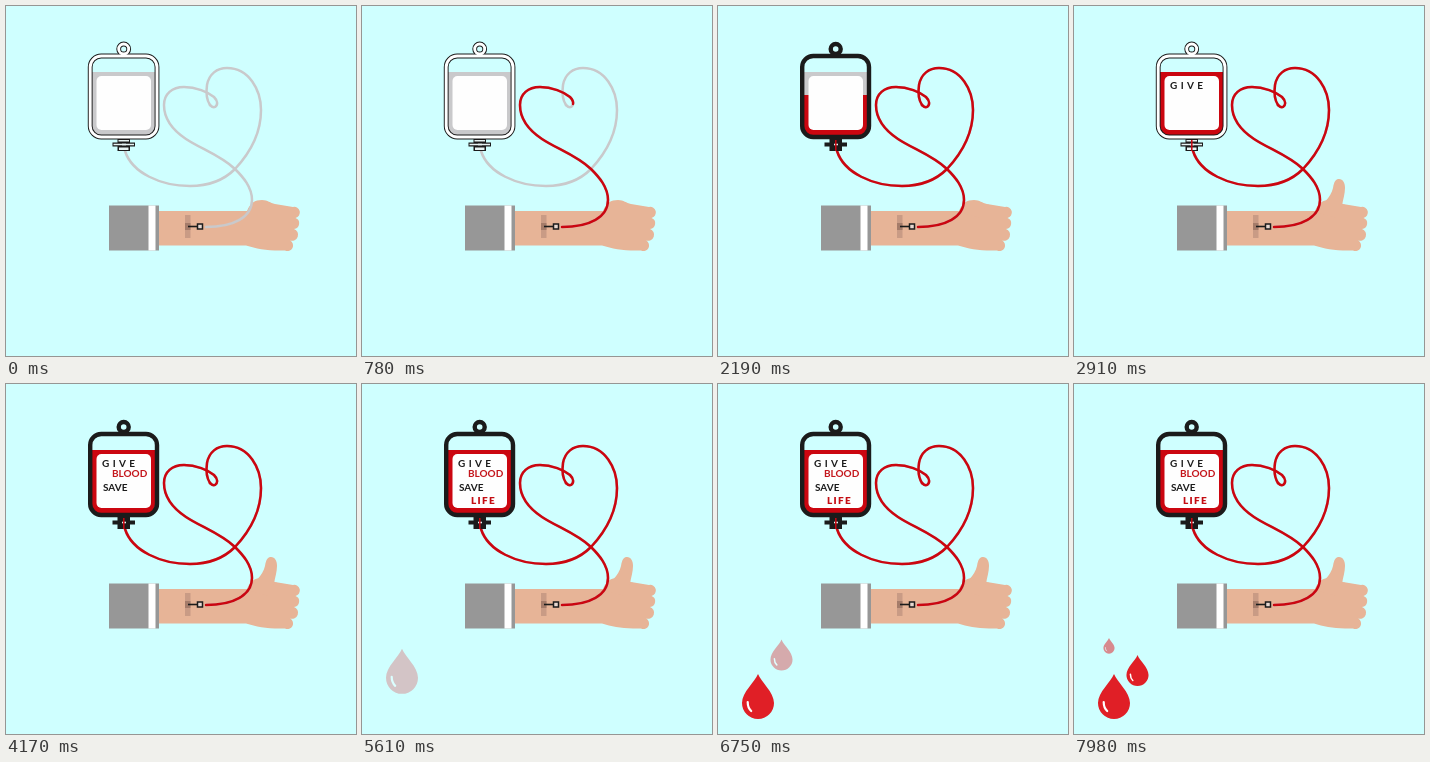
Recreate the animation shown at these times as an HTML page. Size 350 px wide and 350 px high, loop 8 s.

```html
<!DOCTYPE html>
<html lang="en">
<head>
<meta charset="utf-8">
<title>Give blood</title>
<style>
html, body { margin: 0; width: 100%; height: 100%; overflow: hidden; background: #cfffff; }
svg { display: block; width: 100vw; height: 100vh; }
text { font-family: Lato, "Open Sans", sans-serif; font-weight: 700; font-size: 10px; }
.tube { fill: none; stroke-width: 2.5; stroke-linecap: round; stroke-linejoin: round; }
.red { stroke: #cb0610; }
.grey { stroke: #c9c9cb; }
</style>
</head>
<body>
<svg viewBox="0 0 350 350">
  <defs>
    <path id="tubeA" d="M200 221C228 221 246 211 246 194C246 181 237 171 229 163C214 149 195 143 180 133C165 123 158 111 158 99C158 88 166 81 178 81C190 81 202 86 208 91C212 95 212 99 209 101C207 102 205 100 204 99"/>
    <path id="tubeB" d="M204 99C200 93 200 86 201 79C203 68 211 62 221 62C243 62 255 84 255 104C255 126 244 147 229 163C216 176 201 180 184 180C155 180 126 167 119 145"/>
    <g id="drop">
      <path d="M0 0C3 8 16 18 16 29A16 16 0 0 1-16 29C-16 18-3 8 0 0Z" fill="#e01f26"/>
      <path d="M-10.3 28C-10.3 32-9 35-6.8 37" fill="none" stroke="#fff" stroke-width="2.2" stroke-linecap="round"/>
    </g>
    <g id="frame" fill="none">
      <circle cx="117.7" cy="43" r="5"/>
      <rect x="84.2" y="50" width="66.8" height="81" rx="11"/>
    </g>
    <clipPath id="fillClip"><rect id="fillWipe" x="80" width="80" height="80"/></clipPath>
    <clipPath id="thumbClip"><rect id="thumbWipe" x="230" width="70" height="90"/></clipPath>
  </defs>

  <rect width="350" height="350" fill="#cfffff"/>

  <g fill="#e7b497">
    <path d="M152 205H241C244 197 249 194 256 194C262 194 264 197 269 198L287 201A5.5 5.5 0 0 1 289.500 212A5.700 5.700 0 0 1 288 223A5.500 5.500 0 0 1 284 234.500A5 5 0 0 1 279 244.500C262 245 251 243 240 239.500H152Z"/>
    <path clip-path="url(#thumbClip)" d="M240 206C247 199 257 192 259 182C260 175 262 173 265 173C269 173 271 177 271 182C271 188 269 193 268 200L262 212Z"/>
  </g>
  <path d="M103 199.500H153V244.500H103Z" fill="#979797"/>
  <path d="M142.500 199.500H149.500V244.500H142.500Z" fill="#fff"/>
  <path d="M179 209H184.500V232H179Z" fill="#c99b85"/>
  <path d="M179 217H184.500V224H179Z" fill="#a57c6a"/>

  <use href="#tubeA" class="tube grey"/>
  <use href="#tubeB" class="tube grey"/>
  <path id="flowA" class="tube red"/>
  <path id="flowB" class="tube red"/>

  <path d="M182 220.500H191" stroke="#1c1c1c" stroke-width="1.600"/>
  <rect x="191.500" y="218" width="5" height="5" fill="#e8d8d0" stroke="#1c1c1c" stroke-width="1.500"/>

  <path id="bagFill" d="M86 66H149V121Q149 129.500 141 129.500H94Q86 129.500 86 121Z" fill="#c9c9cb"/>
  <use href="#bagFill" id="blood"/>
  <path clip-path="url(#fillClip)" d="M86 66H149V121Q149 129.500 141 129.500H94Q86 129.500 86 121Z" fill="#cb0610"/>
  <rect x="90.500" y="70" width="54.500" height="54" rx="5" fill="#fefefe"/>

  <use href="#frame" stroke="#1b1b1b" stroke-width="4.400" id="dark"/>
  <g id="light">
    <use href="#frame" stroke="#1b1b1b" stroke-width="4.800"/>
    <use href="#frame" stroke="#fff" stroke-width="2.900"/>
  </g>
  <path d="M111.500 133H124V145H111.500ZM106.500 136.500H129V140.500H106.500Z" fill="#1b1b1b"/>
  <path id="valveLight" d="M112.500 134H123V135.500H112.500ZM107.500 137.700H128V139.300H107.500ZM113 141.500H122.500V144H113Z" fill="#e8f4f4"/>
  <path d="M116 137.700H120V139.300H116Z" fill="#e8f4f4"/>
  <path id="valveRed" d="M117.800 134V145" stroke="#cb0610" stroke-width="1.500"/>

  <g id="words">
    <text x="96" y="82.500" letter-spacing="3.400" fill="#1b1b1b">GIVE</text>
    <text x="106" y="92.500" fill="#c4161c">BLOOD</text>
    <text x="97" y="107" font-size="9.500" fill="#1b1b1b">SAVE</text>
    <text x="109" y="120" letter-spacing="1.300" fill="#c40d13" style="font-weight:900">LIFE</text>
  </g>
  <g id="drops"></g>
</svg>
<script>
const LOOP = 8000, STEP = 30;
const $ = id => document.getElementById(id);
const ramp = (t, from, span) => Math.min(1, Math.max(0, (t - from) / span));
const show = (el, on) => el.setAttribute("visibility", on ? "visible" : "hidden");

const flows = [["A", 0], ["B", 810]].map(([key, start]) => {
  const el = $("flow" + key);
  el.setAttribute("d", $("tube" + key).getAttribute("d"));
  const len = el.getTotalLength();
  return { el, start, len };
});

const wordTimes = [2910, 3540, 4170, 4890];
const words = [...$("words").children];

const drops = [
  { x: 40, y: 290, size: 1, fall: 34, start: 5400, span: 810 },
  { x: 63.5, y: 271, size: 0.69, fall: 25, start: 6480, span: 720 },
  { x: 35, y: 264, size: 0.35, fall: 21, start: 7560, span: 810 }
];
for (const d of drops) {
  d.el = document.createElementNS("http://www.w3.org/2000/svg", "use");
  d.el.setAttribute("href", "#drop");
  $("drops").append(d.el);
}

$("blood").remove();

function draw(time) {
  const t = Math.floor(time / STEP) * STEP;

  for (const { el, start, len } of flows) {
    const p = ramp(t, start, 810);
    show(el, p > 0);
    el.setAttribute("stroke-dasharray", `${len * p} ${len + 10}`);
  }

  const rise = ramp(t, 1680, 810);
  $("fillWipe").setAttribute("y", 130 - 65 * rise);
  $("thumbWipe").setAttribute("y", 245 - 73 * rise);

  const light = t < 840 || (t >= 2910 && t < 3540);
  show($("light"), light);
  show($("dark"), !light);
  show($("valveLight"), light);
  show($("valveRed"), t >= 1620);

  words.forEach((el, i) => show(el, t >= wordTimes[i]));

  for (const d of drops) {
    const p = ramp(t, d.start, d.span);
    d.el.setAttribute("opacity", p);
    d.el.setAttribute("transform", `translate(${d.x} ${d.y - d.fall * (1 - p)}) scale(${d.size})`);
  }
}

const begin = performance.now();
function tick() {
  draw((performance.now() - begin) % LOOP);
  requestAnimationFrame(tick);
}
tick();
</script>
</body>
</html>
```
